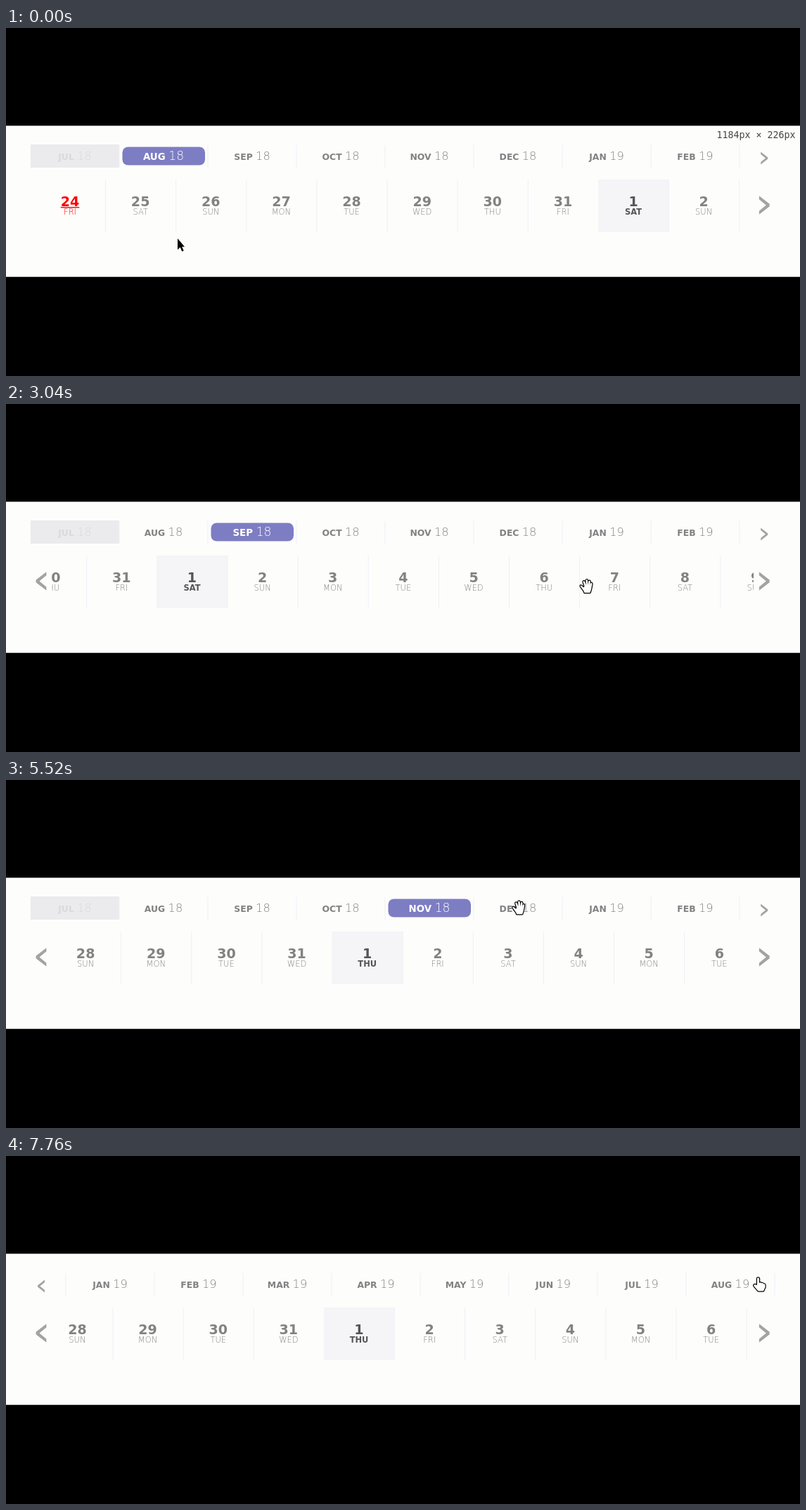
An HTML page with a canvas for the animation above (8 s loop, 1129 px wide and 496 px high).

```html
<!DOCTYPE html>
<html lang="en">
<head>
<meta charset="utf-8">
<title>Date slider</title>
<style>
html, body { margin: 0; width: 100%; height: 100%; overflow: hidden; background: #000; }
canvas { display: block; }
</style>
</head>
<body>
<canvas id="stage" width="1129" height="496"></canvas>
<script>
const ctx = document.getElementById('stage').getContext('2d');
const LOOP = 8000, STEP = 40;
const LEFT = 35, RIGHT = 1094, COVER = 30;
const PAPER = '#fdfdfc', LINE = '#f0f0f7', GREY = '#828282';
const DAY_W = 100.13, MONTH_W = 126, MONTH_END = 706;
const MONTHS = 'JAN FEB MAR APR MAY JUN JUL AUG SEP OCT NOV DEC'.split(' ');
const DAYS = 'SUN MON TUE WED THU FRI SAT'.split(' ');

// Cursor stops: arrival time, x, y. A move takes at most MOVE ms.
const MOVE = 800;
const stops = [
  [0, 244, 300], [400, 84, 250], [640, 84, 250], [1040, 880, 230],
  [1840, 440, 258], [2160, 681, 193], [2400, 900, 260], [3640, 598, 250],
  [4080, 573, 161], [4480, 573, 161], [4640, 595, 183],
  [6080, 1039, 172], [6320, 1069, 174]
];

const arrowShape = new Path2D('M0 0V16L3.7 12.6 6.2 18.5 8.7 17.4 6.2 11.7H10Z');
const handShape = new Path2D('M5 12L2 9.5C0 8-.5 10 1 11.5L5 17 6 19.5H14L15.5 15 17 7' +
  'C17 5 15 5 14.5 6.5L14 9 14.3 3.5C14 1.8 12 1.8 11.8 3.5L11.3 8.5 10.5 2' +
  'C10 .3 8 .5 8 2.2L8.3 8.5 6.5 3.8C5.5 2 3.5 3 4.2 4.8L6 10Z');
const pointerShape = new Path2D('M6 11V2C6 0 9 0 9 2V8C11 6.5 12 7.5 12 8.5C14 7.5 15 8.5 15 9.5' +
  'C17 9 17.5 10 17.5 11V14L15 19.5H7.5L1.5 12.5C.5 10.5 3 9.5 4 10.5Z');

const progress = (t, start, span) => Math.min(1, Math.max(0, (t - start) / span));
const ease = u => (1 - Math.cos(Math.PI * u)) / 2;

// A flick, a slower drag, then the jump to the chosen month.
const dayScrollAt = t => 492.6 * progress(t, 1040, 800) ** 1.21
  + 539.8 * progress(t, 2840, 800)
  + 5465.6 * ease(progress(t, 4640, 906.7));
const monthScrollAt = t => MONTH_END * ease(progress(t, 6320, 1440));

function cursorAt(t) {
  const next = stops.findIndex(s => s[0] > t);
  if (next < 0) return stops[stops.length - 1].slice(1);
  const [t0, x0, y0] = stops[next - 1], [t1, x1, y1] = stops[next];
  const span = Math.min(MOVE, t1 - t0), u = progress(t, t1 - span, span);
  return [x0 + (x1 - x0) * u, y0 + (y1 - y0) * u];
}

function rect(color, x, y, w, h) {
  ctx.fillStyle = color;
  ctx.fillRect(x, y, w, h);
}

function setFont(weight, size) {
  ctx.font = `${weight} ${size}px "DejaVu Sans", sans-serif`;
}

function text(str, x, y, weight, size, color, align = 'center') {
  setFont(weight, size);
  ctx.fillStyle = color;
  ctx.textAlign = align;
  ctx.fillText(str, x, y);
  return ctx.measureText(str).width;
}

// Arrowhead with upright ends; dir is 1 for right, -1 for left.
function chevron(x, y, dir, size) {
  const w = size * 0.72, h = size * 1.28, thick = size * 0.48;
  ctx.fillStyle = '#a3a3a3';
  ctx.beginPath();
  ctx.moveTo(x - dir * w, y - h);
  ctx.lineTo(x + dir * w, y - thick / 3);
  ctx.lineTo(x + dir * w, y + thick / 3);
  ctx.lineTo(x - dir * w, y + h);
  ctx.lineTo(x - dir * w, y + h - thick);
  ctx.lineTo(x + dir * (w - thick), y);
  ctx.lineTo(x - dir * w, y - h + thick);
  ctx.fill();
}

function monthCell(i, x, selected) {
  const off = i === 0, size = selected ? 13.35 : 12.4, yearSize = selected ? 17.2 : 16.2;
  if (off) rect('#ebebee', x - 63, 166, MONTH_W, 33);
  rect(LINE, x + 62.5, 167, 1, 32);
  if (selected) {
    ctx.fillStyle = '#7d7dc3';
    ctx.beginPath();
    ctx.roundRect(x - 58.5, 169.5, 117.5, 26, 8);
    ctx.fill();
  }
  const name = MONTHS[(6 + i) % 12], year = i < 6 ? '18' : '19';
  setFont('bold', size);
  const nameW = ctx.measureText(name + ' ').width;
  setFont(200, yearSize);
  const start = x - (nameW + ctx.measureText(year).width) / 2;
  const color = off ? '#d9d9de' : selected ? '#fff' : GREY;
  text(name, start, 188, 'bold', size, color, 'left');
  text(year, start + nameW, 188, 200, yearSize, color, 'left');
}

function dayCell(i, x) {
  const date = new Date(Date.UTC(2018, 7, 24 + i));
  const n = date.getUTCDate(), first = n === 1, today = i === 0;
  if (first) rect('#f5f5f8', x - 50, 216, 101, 75);
  rect(LINE, x + 50, 216, 1, 75);
  const color = today ? '#f00' : first ? '#555' : GREY;
  const w = text(n, x, 254, 'bold', 19.07, color);
  if (today) rect(color, x - w / 2, 255, w, 1.4);
  text(DAYS[date.getUTCDay()], x, 266, first ? 'bold' : 200, 11.44, color);
}

function covers(y, h, left, right, arrowY, size) {
  if (left) {
    rect(PAPER, LEFT, y, COVER, h);
    chevron(50, arrowY, -1, size);
  }
  if (right) {
    rect(PAPER, RIGHT - COVER - 1, y, COVER + 1, h);
    chevron(1078.3, arrowY, 1, size);
  }
}

function cursor(x, y) {
  const inside = y > 165 && y < 293;
  const [shape, dx, dy] = !inside ? [arrowShape, 0, 0]
    : x > 1055 ? [pointerShape, 7, 1] : [handShape, 8, 8];
  ctx.save();
  ctx.translate(x - dx, y - dy);
  ctx.lineJoin = 'round';
  ctx.lineWidth = inside ? 2.4 : 1.5;
  ctx.strokeStyle = inside ? '#000' : '#fff';
  ctx.fillStyle = inside ? '#fff' : '#000';
  ctx.stroke(shape);
  ctx.fill(shape);
  ctx.restore();
}

function draw(t) {
  const dayScroll = dayScrollAt(t), monthScroll = monthScrollAt(t);
  const selected = t < 1640 ? 1 : t < 4640 ? 2 : 4;

  rect('#000', 0, 0, 1129, 496);
  rect(PAPER, 0, 139.3, 1129, 215.4);

  ctx.save();
  ctx.beginPath();
  ctx.rect(LEFT, 140, RIGHT - LEFT, 214);
  ctx.clip();
  for (let i = 0; i < 14; i++) {
    monthCell(i, 98 + i * MONTH_W - monthScroll, i === selected);
  }
  const from = Math.max(0, Math.floor(dayScroll / DAY_W) - 1);
  for (let i = from; i < from + 14; i++) dayCell(i, 91 + i * DAY_W - dayScroll);
  covers(164, 37, monthScroll > 0, monthScroll < MONTH_END, 185.5, 7);
  covers(214, 80, dayScroll > 0, true, 252.5, 10.3);
  ctx.restore();

  if (t < 200) {
    ctx.font = '13.3px "DejaVu Sans Mono", monospace';
    ctx.fillStyle = '#444';
    ctx.textAlign = 'left';
    ctx.fillText('1184px × 226px', 1010.5, 157);
  }
  cursor(...cursorAt(t));
}

const begin = performance.now();
function frame() {
  const t = (performance.now() - begin) % LOOP;
  draw(Math.floor(t / STEP) * STEP);
  requestAnimationFrame(frame);
}
frame();
</script>
</body>
</html>
```
